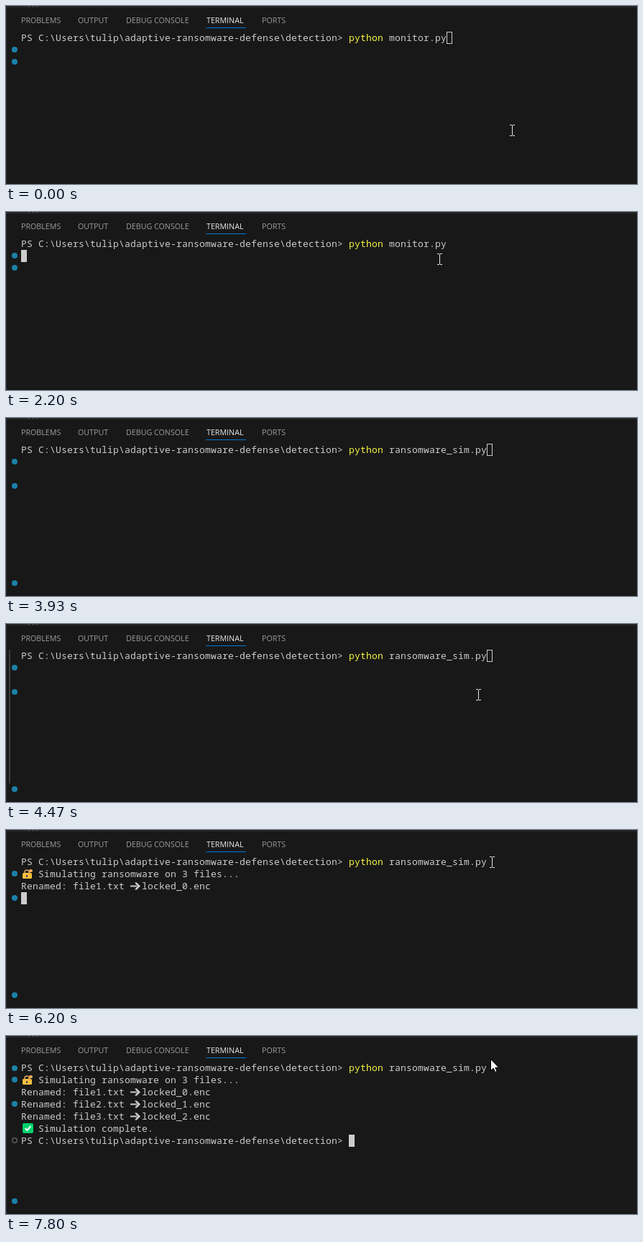
Write an HTML page with a canvas that moves like this. It is 878 px wide and 249 px high and loops after 8 s.

```html
<!DOCTYPE html>
<html lang="en">
<head>
<meta charset="utf-8">
<title>Terminal</title>
<style>
  html, body { margin: 0; width: 100%; height: 100%; overflow: hidden; background: #181818; }
  canvas { display: block; }
</style>
</head>
<body>
<canvas id="stage" width="878" height="249"></canvas>
<script>
const ctx = document.getElementById('stage').getContext('2d');
const LOOP = 8000, TICKS_PER_MS = 15 / 1000;
const LEFT = 21, TOP = 36, CELL = 8, ROW = 17;
const FG = '#cccccc', BLUE = '#1b81a8';
const PROMPT = 'PS C:\\Users\\tulip\\adaptive-ransomware-defense\\detection> ';

const col = n => LEFT + n * CELL;
const row = n => TOP + n * ROW;

function box(color, x, y, w, h) {
  ctx.fillStyle = color;
  ctx.fillRect(x, y, w, h);
}

function type(text, column, line, color = FG) {
  ctx.font = '13px "Noto Sans Mono", monospace';
  ctx.textAlign = 'center';
  ctx.fillStyle = color;
  [...text].forEach((ch, i) => {
    if (ch !== ' ') ctx.fillText(ch, col(column + i) + CELL / 2, row(line) + 13);
  });
}

function shape(points, fill, stroke) {
  ctx.beginPath();
  points.forEach(([x, y]) => ctx.lineTo(x, y));
  ctx.closePath();
  ctx.fillStyle = fill;
  ctx.fill();
  if (stroke) {
    ctx.strokeStyle = stroke;
    ctx.lineWidth = 1;
    ctx.stroke();
  }
}

function line(points, color, width) {
  ctx.beginPath();
  points.forEach(([x, y]) => ctx.lineTo(x, y));
  ctx.strokeStyle = color;
  ctx.lineWidth = width;
  ctx.stroke();
}

function rounded(color, x, y, w, h, r) {
  ctx.beginPath();
  ctx.roundRect(x, y, w, h, r);
  ctx.fillStyle = color;
  ctx.fill();
}

function dot(y) {
  ctx.beginPath();
  ctx.arc(12, y, 4, 0, Math.PI * 2);
  ctx.fillStyle = BLUE;
  ctx.fill();
}

function ring(y) {
  ctx.beginPath();
  ctx.arc(12, y, 3.4, 0, Math.PI * 2);
  ctx.strokeStyle = '#6b6b6b';
  ctx.lineWidth = 1.2;
  ctx.stroke();
}

function panel() {
  box('#181818', 0, 0, 878, 249);
  box('#1f1f1f', 0, 0, 878, 1);
  box('#2b2b2b', 0, 1, 878, 1);
  box('#2b2b2b', 0, 1, 1, 248);
  for (const x of [31, 37, 42]) box('#555555', x, 0, 2, 1);
  ctx.font = '10.7px "Open Sans", sans-serif';
  ctx.textAlign = 'left';
  const tabs = { PROBLEMS: 21, OUTPUT: 100, 'DEBUG CONSOLE': 167, TERMINAL: 279, PORTS: 356 };
  for (const [name, x] of Object.entries(tabs)) {
    ctx.fillStyle = name === 'TERMINAL' ? '#e7e7e7' : '#9d9d9d';
    ctx.fillText(name, x, 24);
  }
  box('#0078d4', 278, 30, 56, 1);
}

function block(column, line, hollow) {
  if (!hollow) return box(FG, col(column), row(line), CELL, ROW);
  ctx.strokeStyle = FG;
  ctx.lineWidth = 1;
  ctx.strokeRect(col(column) + 0.5, row(line) + 0.5, CELL - 1, ROW - 1);
}

function lock(x, y) {
  ctx.beginPath();
  ctx.arc(x + 6, y + 5, 3, Math.PI, 0);
  ctx.lineTo(x + 9, y + 8);
  ctx.moveTo(x + 3, y + 5);
  ctx.lineTo(x + 3, y + 8);
  ctx.strokeStyle = '#d8a45c';
  ctx.lineWidth = 1.6;
  ctx.stroke();
  rounded('#f9c23c', x, y + 6, 13, 8, 1.5);
  box('#433b6b', x + 5, y + 9, 2, 3);
  line([[x + 10, y + 3], [x + 10, y + 9]], '#e39d3a', 1.5);
  rounded('#f3ad61', x + 9, y + 1, 5, 4, 2);
}

function check(x, y) {
  rounded('#00d26a', x, y, 15, 14, 2);
  line([[x + 3.5, y + 7], [x + 6.5, y + 10], [x + 11.5, y + 4]], '#ffffff', 2);
}

function renamed(n) {
  const y = row(n + 1) + 8.5;
  type(`Renamed: file${n}.txt`, 0, n + 1);
  line([[173, y], [182, y]], FG, 2);
  shape([[179, y - 5], [182, y - 5], [187, y], [182, y + 5], [179, y + 5], [183, y]], FG);
  type(`locked_${n - 1}.enc`, 21, n + 1);
}

function command(file) {
  type(PROMPT, 0, 0);
  type('python', 57, 0, '#f5f543');
  type(file, 64, 0);
}

function monitorTerminal(t) {
  command('monitor.py');
  dot(61);
  dot(78);
  if (t < 33) return block(74, 0, t < 17);
  if (t < 41) return block(0, 1);
  type("[+] Monitoring started on 'test_dir'... Press Ctrl+C to stop.", 0, 1);
  block(0, 2);
}

function simulationTerminal(t) {
  if (t >= 78 && t < 91) box('#264f78', col(81), TOP, 2 * CELL, ROW);
  command('ransomware_sim.py');
  [61, 95, 231].forEach(dot);

  const fade = Math.min(1, (t - 63) / 2, (93 - t) / 3);
  if (fade > 0) box(`rgba(121,121,121,${0.4 * fade})`, 4, TOP, 2, 187);

  if (t < 91) {
    if (t >= 59) block(81, 0, t < 75);
    return;
  }
  if (t >= 92) {
    lock(23, 54);
    type('Simulating ransomware on 3 files...', 3, 1);
  }
  const done = [93, 98, 102].filter(start => t >= start).length;
  for (let n = 1; n <= done; n++) renamed(n);
  if (t < 107) return block(0, t < 92 ? 1 : 2 + done);

  check(23, 122);
  type('Simulation complete.', 3, 5);
  type(PROMPT, 0, 6);
  dot(45);
  ring(146);
  block(57, 6);
}

// Pointer path: [tick, x, y, kind]
const path = [
  [0, 704, 174], [3, 655, 92], [6, 624, 42], [11, 624, 42], [12, 628, 41], [13, 630, 43],
  [15, 624, 45], [18, 624, 45], [21, 603, 66], [44, 603, 66], [45, 690, 48],
  [46, 862, 4, 'arrow'], [47, 0, 0, 'none'], [64, 751, 120], [65, 672, 98], [66, 672, 98],
  [67, 657, 99], [69, 660, 88], [72, 675, 56], [74, 684, 46], [78, 676, 45],
  [115, 676, 45], [116, 674, 25, 'arrow'], [117, 674, 32, 'arrow'], [120, 674, 32, 'arrow']
];

function ibeam(x, y) {
  ctx.globalCompositeOperation = 'difference';
  box('#ffffff', x, y - 7, 1, 14);
  for (const edge of [y - 8, y + 7]) {
    box('#ffffff', x - 3, edge, 3, 1);
    box('#ffffff', x + 1, edge, 3, 1);
  }
  ctx.globalCompositeOperation = 'source-over';
}

function arrow(x, y) {
  const outline = [[0, 0], [0, 16], [3.7, 12.6], [6.2, 18], [8.6, 17], [6.2, 11.7], [11, 11.5]];
  shape(outline.map(([dx, dy]) => [x + dx + 0.5, y + dy + 0.5]), '#ffffff', '#000000');
}

function pointer(t) {
  const i = path.findLastIndex(key => key[0] <= t);
  const [start, x, y, kind] = path[i];
  if (kind === 'none') return;
  const [end, nextX, nextY] = path[i + 1] || path[i];
  const f = end > start ? (t - start) / (end - start) : 0;
  const draw = kind === 'arrow' ? arrow : ibeam;
  draw(Math.round(x + (nextX - x) * f), Math.round(y + (nextY - y) * f));
}

function render(now) {
  const t = Math.floor((now % LOOP + 4) * TICKS_PER_MS) % 120;
  panel();
  (t < 58 ? monitorTerminal : simulationTerminal)(t);
  pointer(t);
  requestAnimationFrame(render);
}

render(0);
</script>
</body>
</html>
```
